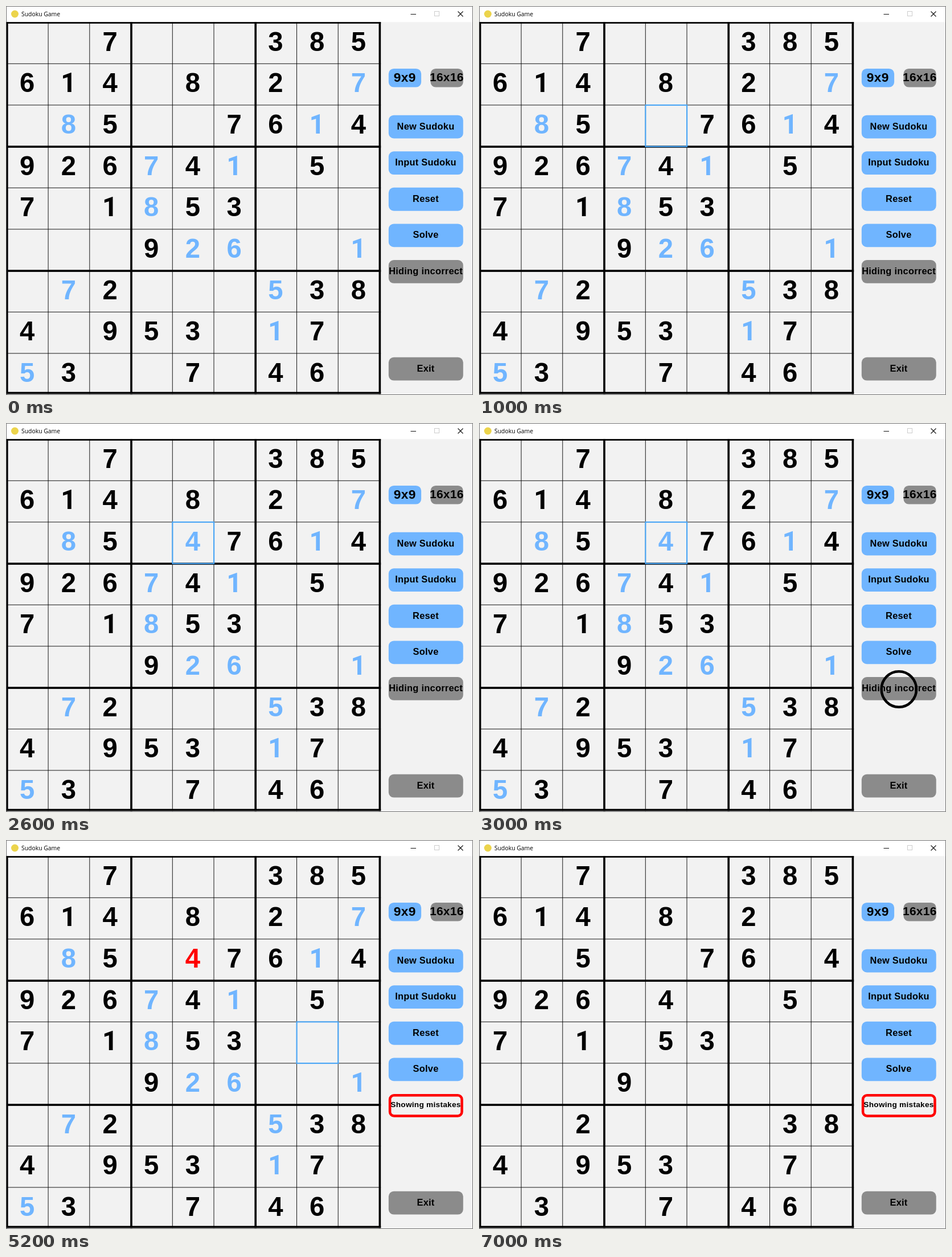
An HTML page for the animation above (8000 ms loop, 820 px wide and 683 px high).

```html
<!DOCTYPE html>
<html lang="en">
<head>
<meta charset="utf-8">
<title>Sudoku Game</title>
<style>
  html, body { margin: 0; width: 100%; height: 100%; overflow: hidden; background: #f2f2f2; }
  svg { display: block; width: 820px; height: 683px; }
  text { font-family: "Liberation Sans", Arial, sans-serif; font-weight: 700; text-anchor: middle; }
  .title { font: 400 10.4px "Open Sans", sans-serif; text-anchor: start; }
  .digit { font-size: 52px; }
  .one { font-family: Roboto, sans-serif; }
  .label { letter-spacing: .3px; }
  .blue { fill: #70b5ff; }
  .gray { fill: #8b8b8b; }
  .red { fill: #f00; }
  .cursor { fill: none; stroke: #4ba6f5; stroke-width: 2.4; }
  .ring { fill: none; stroke: #000; stroke-width: 4.6; }

  .anim { animation: 8s step-end infinite; }
  .answers { animation-name: answers; }
  .pick { animation-name: pick; }
  .guess { animation-name: guess; }
  .hiding { animation-name: hiding; }
  .tap-hiding { animation-name: tap-hiding; }
  .mistake { animation-name: mistake; }
  .showing { animation-name: showing; }
  .tap-reset { animation-name: tap-reset; }
  @keyframes answers { 0% { visibility: visible } 87.5%, 100% { visibility: hidden } }
  @keyframes pick { 0% { visibility: hidden } 12.5% { visibility: visible } 50%, 100% { visibility: hidden } }
  @keyframes guess { 0% { visibility: hidden } 25% { visibility: visible } 50%, 100% { visibility: hidden } }
  @keyframes hiding { 0% { visibility: visible } 50%, 100% { visibility: hidden } }
  @keyframes tap-hiding { 0% { visibility: hidden } 37.5% { visibility: visible } 50%, 100% { visibility: hidden } }
  @keyframes mistake { 0% { visibility: hidden } 50% { visibility: visible } 87.5%, 100% { visibility: hidden } }
  @keyframes showing { 0% { visibility: hidden } 50%, 100% { visibility: visible } }
  @keyframes tap-reset { 0% { visibility: hidden } 75% { visibility: visible } 87.5%, 100% { visibility: hidden } }
</style>
</head>
<body>
<svg viewBox="0 0 820 683">
  <rect width="820" height="683" fill="#f2f2f2"/>
  <rect width="820" height="28.2" fill="#fff"/>
  <circle cx="15.5" cy="14" r="6.5" fill="#ecd44c"/>
  <text class="title" x="27" y="18">Sudoku Game</text>
  <path d="M710.5 14.5H720" stroke="#111" fill="none"/>
  <rect x="752.5" y="9.5" width="8" height="8" fill="none" stroke="#ccc"/>
  <path d="M793.5 9.5L802.5 18.5M802.5 9.5L793.5 18.5" stroke="#111" stroke-width="1.1"/>
  <path d="M.5 683V.5H819.5V682.5H0" fill="none" stroke="#707070"/>

  <!-- The 900 x 720 game area, 80 units per cell, inside the window frame -->
  <g transform="scale(.9091 .9083) translate(1 31)">
    <g id="grid"></g>
    <g id="clues"></g>
    <g id="answers" class="anim answers"></g>
    <g id="guess" class="anim guess"></g>
    <g id="mistake" class="anim mistake"></g>
    <rect class="cursor anim pick" x="320.6" y="160.6" width="80" height="80"/>
    <rect class="cursor anim mistake" x="560.6" y="320.6" width="80" height="80"/>

    <g id="buttons"></g>
    <g id="hiding" class="anim hiding"></g>
    <g class="anim showing">
      <rect x="740.5" y="462.5" width="139" height="40" rx="8" fill="#f2f2f2" stroke="#f00" stroke-width="5"/>
      <text class="label" x="809.7" y="485.5" font-size="15">Showing mistakes</text>
    </g>
  </g>
  <ellipse class="ring anim tap-hiding" cx="737.3" cy="467.5" rx="30.7" ry="31.2"/>
  <ellipse class="ring anim tap-reset" cx="737.7" cy="339.7" rx="30.7" ry="27.4"/>
</svg>
<script>
  const CELL = 80;
  const byId = id => document.getElementById(id);

  function add(parent, tag, attrs, text = "") {
    const node = document.createElementNS("http://www.w3.org/2000/svg", tag);
    for (const key in attrs) node.setAttribute(key, attrs[key]);
    node.textContent = text;
    parent.append(node);
  }

  function drawGrid() {
    const grid = byId("grid");
    for (let i = 0; i <= 9; i++) {
      const thick = i % 3 === 0;
      const size = thick ? 4 : 1;
      const x = Math.max(0, i * CELL - (thick ? 1 : 0));
      const y = i < 9 ? x : 715;
      const weight = i ? size : 3;
      add(grid, "rect", { x, y: 0, width: weight, height: 719 });
      add(grid, "rect", { x: 0, y, width: 723, height: weight });
    }
  }

  function drawDigit(parent, row, col, value, color) {
    add(parent, "text", {
      class: `digit ${color}${value === "1" ? " one" : ""}`,
      x: 39.8 + col * CELL,
      y: 55.7 + row * CELL
    }, value);
  }

  function drawRows(parent, rows, color) {
    rows.forEach((row, r) => [...row].forEach((value, c) => {
      if (value !== ".") drawDigit(parent, r, c, value, color);
    }));
  }

  function drawButton(parent, x, y, width, height, color, text, size = 18) {
    add(parent, "rect", { class: color, x, y, width, height, rx: 10 });
    add(parent, "text", {
      class: "label", x: x + width / 2 - 0.3, y: y + height / 2 + size * 0.28, "font-size": size
    }, text);
  }

  drawGrid();
  drawRows(byId("clues"), [
    "..7...385", "614.8.2..", "..5..76.4",
    "926.4..5.", "7.1.53...", "...9.....",
    "..2....38", "4.953..7.", ".3..7.46."
  ], "black");
  drawRows(byId("answers"), [
    ".........", "........7", ".8.....1.",
    "...7.1...", "...8.....", "....26..1",
    ".7....5..", "......1..", "5........"
  ], "blue");
  drawDigit(byId("guess"), 2, 4, "4", "blue");
  drawDigit(byId("mistake"), 2, 4, "4", "red");

  const buttons = byId("buttons");
  drawButton(buttons, 738, 90, 63, 36, "blue", "9x9", 25);
  drawButton(buttons, 819, 90, 63, 36, "gray", "16x16", 23);
  ["New Sudoku", "Input Sudoku", "Reset", "Solve"].forEach((text, i) =>
    drawButton(buttons, 738, 180 + i * 70, 144, 45, "blue", text));
  drawButton(buttons, 738, 648, 144, 45, "gray", "Exit");
  drawButton(byId("hiding"), 738, 460, 144, 45, "gray", "Hiding incorrect");
</script>
</body>
</html>
```
